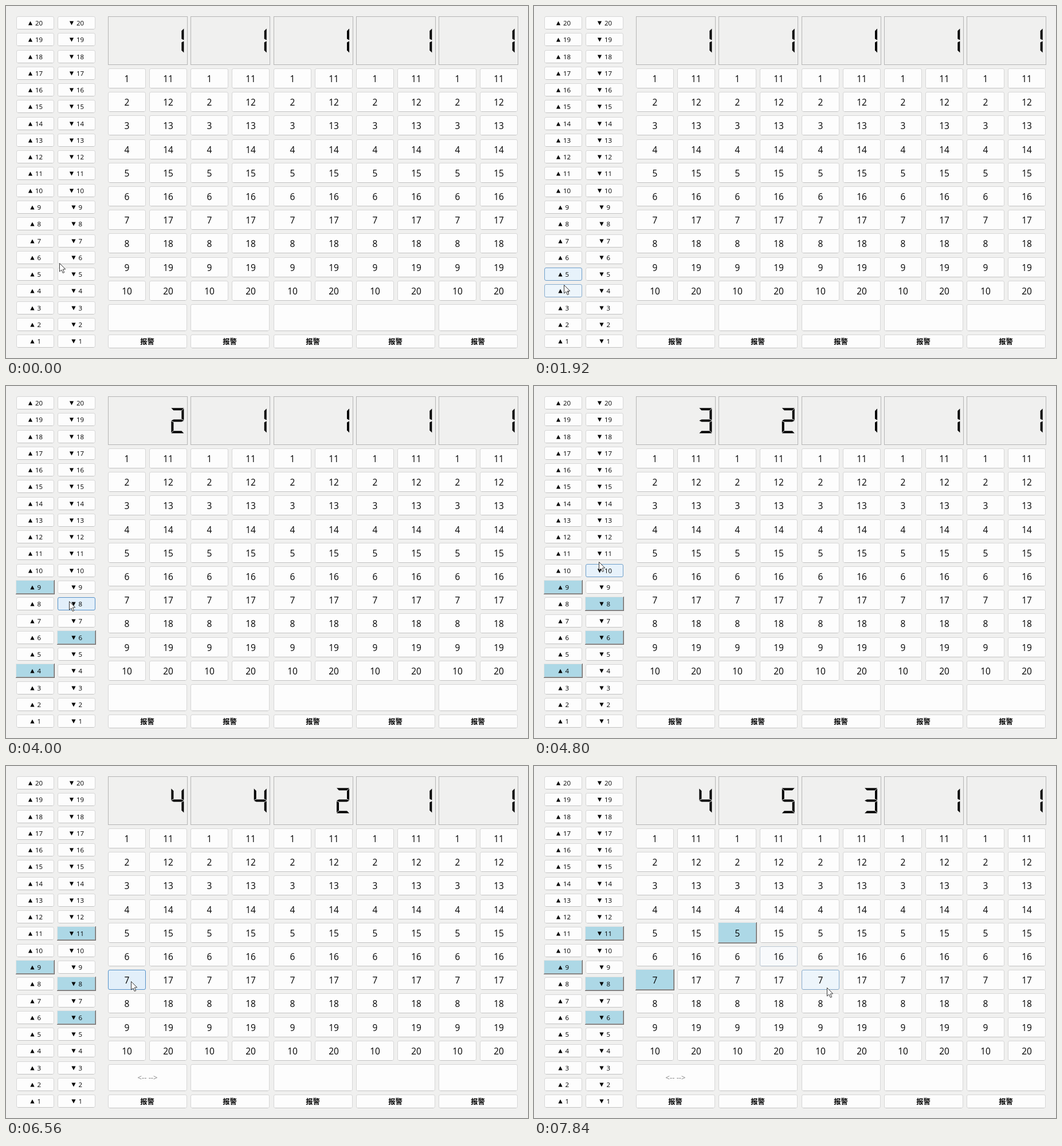
Write an HTML page with a canvas that moves like this. It is 911 px wide and 615 px high and loops after 8000 ms.

```html
<!DOCTYPE html>
<html lang="zh">
<head>
<meta charset="utf-8">
<style>
  html, body { margin: 0; width: 100%; height: 100%; overflow: hidden; background: #f0f0ef; }
  canvas { display: block; }
</style>
</head>
<body>
<canvas id="stage" width="911" height="615"></canvas>
<script>
const ctx = document.getElementById('stage').getContext('2d');
const LOOP = 8000, TICK = 160, FLOOR_TIME = 1000;
const SANS = '"Open Sans", "Noto Sans", sans-serif';
const CJK = '"Noto Sans CJK SC", "Noto Sans CJK", sans-serif';

// Where the pointer pauses, turns or clicks
const stop = (time, x, y, click = false) => ({ time, x, y, click });
const ROUTE = [
  stop(0, 93, 449), stop(800, 185, 403), stop(1760, 64, 472), stop(1920, 52, 487),
  stop(2400, 50, 494, true), stop(2720, 112, 438, true),
  stop(2880, 106, 408), stop(3040, 62, 380), stop(3200, 55, 362), stop(3520, 53, 350, true),
  stop(4160, 114, 378, true), stop(4640, 113, 316), stop(4800, 113, 307), stop(5120, 115, 297, true),
  stop(5600, 266, 366), stop(5760, 282, 414), stop(6400, 218, 376), stop(6720, 218, 376, true),
  stop(7360, 358, 296, true), stop(7680, 463, 362), stop(7840, 511, 387)
];

const LIFTS = [
  { departs: 2500, goal: 4 }, { departs: 3500, goal: 5 }, { departs: 5500, goal: 3 },
  { departs: LOOP, goal: 1 }, { departs: LOOP, goal: 1 }
];
const arrival = lift => lift.departs + (lift.goal - 1) * FLOOR_TIME;
const liftFloor = (lift, t) =>
  Math.min(lift.goal, 1 + Math.max(0, Math.floor((t - lift.departs) / FLOOR_TIME)));

const colX = col => 178 + 72.16 * col;
const inside = (b, p) => p.x >= b.x && p.x <= b.x + b.w && p.y > b.y && p.y <= b.y + b.h;

const buttons = [];
function addButton(floor, x, y, h, arrow = 0) {
  const b = { floor, x: Math.round(x), y: Math.round(y), w: 65, h, arrow };
  const click = ROUTE.find(s => s.click && inside(b, s));
  b.on = click ? click.time : Infinity;
  b.off = arrow < 0 && floor === LIFTS[0].goal ? arrival(LIFTS[0]) : Infinity;
  buttons.push(b);
}
for (let floor = 1; floor <= 20; floor++) {
  const y = 18 + 29.27 * (20 - floor);
  addButton(floor, 18, y, 22, -1);
  addButton(floor, 90, y, 22, 1);
  LIFTS.forEach((_, i) =>
    addButton(floor, colX(2 * i + (floor > 10)), 109 + 41.2 * ((floor - 1) % 10), 34));
}

function pointer(t) {
  const i = Math.max(1, ROUTE.findIndex(s => s.time >= t));
  const a = ROUTE[i - 1], b = ROUTE[i];
  const k = (t - a.time) / (b.time - a.time);
  const ease = k * (2 - k);
  return { x: Math.round(a.x + (b.x - a.x) * ease), y: Math.round(a.y + (b.y - a.y) * ease) };
}

// Highlight rises quickly under the pointer and fades slowly after it
function hoverLevel(b, t) {
  let level = 0;
  for (let s = Math.max(TICK, t - 10 * TICK); s <= t; s += TICK)
    level = inside(b, pointer(s)) ? Math.min(1, level + 0.6) : Math.max(0, level - 0.2);
  return level;
}

const mix = (a, b, k) => `rgb(${a.map((v, i) => Math.round(v + (b[i] - v) * k))})`;

function fillPolygon(points, x, y, color = '#000') {
  ctx.beginPath();
  points.forEach(([px, py]) => ctx.lineTo(x + px, y + py));
  ctx.closePath();
  ctx.fillStyle = color;
  ctx.fill();
}

function label(text, x, y, font, color = '#000', align = 'center') {
  ctx.font = font;
  ctx.fillStyle = color;
  ctx.textAlign = align;
  ctx.fillText(text, x, y);
}

function box(x, y, w, h, hover = 0) {
  const blue = [85, 145, 200];
  ctx.beginPath();
  ctx.roundRect(x + 0.5, y + 0.5, w, h, 2.5);
  ctx.fillStyle = mix([253, 253, 253], [226, 239, 250], hover);
  ctx.fill();
  ctx.strokeStyle = mix([214, 214, 214], blue, hover);
  ctx.lineWidth = 1;
  ctx.stroke();
  ctx.fillStyle = mix([194, 194, 194], blue, hover);
  ctx.fillRect(x + 3, y + h, w - 5, 1);
}

function litBox(x, y, w, h) {
  const layer = (color, inset, edge) => {
    ctx.fillStyle = color;
    ctx.fillRect(x + inset, y + inset, w - inset - edge, h - inset - edge);
  };
  layer('#696969', 0, 0);
  layer('#e3e3e3', 0, 1);
  layer('#a0a0a0', 1, 1);
  layer('#add8e6', 1, 2);
}

function drawButton(b, t) {
  if (t >= b.on && t < b.off) litBox(b.x - 1, b.y - 1, b.w + 3, b.h + 3);
  else box(b.x, b.y, b.w, b.h, hoverLevel(b, t));

  const cx = b.x + b.w / 2 + 0.5, cy = b.y + b.h / 2 + 0.5;
  if (!b.arrow) return label(b.floor, cx, cy + 6, '15.5px ' + SANS);
  const left = cx - (b.floor > 9 ? 12.5 : 9);
  const tip = 3.6 * b.arrow;
  fillPolygon([[0.4, -tip], [7.6, -tip], [4, tip]], left, cy + 0.5);
  label(b.floor, left + 12.5, cy + 4.5, '11.5px ' + SANS, '#000', 'left');
}

// Seven-segment digits: one bar, one post and their mirror images
const LEN = 22, THICK = 4, HALF = THICK / 2;
const flipX = shape => shape.map(([x, y]) => [LEN - x, y]);
const flipY = shape => shape.map(([x, y]) => [x, 2 * LEN - y]);
const bar = [[0, 0], [LEN, 0], [LEN - THICK, THICK], [THICK, THICK]];
const post = [[0, 1], [THICK, THICK + 1], [THICK, LEN - HALF - 1], [0, LEN - 1]];
const middle = [[0, LEN], [THICK, LEN - HALF], [LEN - THICK, LEN - HALF]];
const SEGMENTS = {
  a: bar, b: flipX(post), c: flipX(flipY(post)), d: flipY(bar), e: flipY(post), f: post,
  g: [...middle, ...flipX(flipY(middle))]
};
const DIGITS = { 1: 'bc', 2: 'abged', 3: 'abgcd', 4: 'fgbc', 5: 'afgcd' };

function drawLift(lift, i, t) {
  const exact = colX(2 * i), x = Math.round(exact);
  ctx.strokeStyle = '#b4b4b4';
  ctx.lineWidth = 1;
  ctx.strokeRect(x + 0.5, 18.5, 138, 84);
  for (const s of DIGITS[liftFloor(lift, t)]) fillPolygon(SEGMENTS[s], exact + 110.4, 38.5);
  box(x, 521, 137, 46);
  box(x, 574, 137, 23);
  if (i === 0 && t >= arrival(lift) + FLOOR_TIME)
    label('<-- -->', x + 69, 549, '13px ' + SANS, '#808080');
  label('报警', x + 68.5, 591, 'bold 12.3px ' + CJK);
}

function drawPointer({ x, y }) {
  const arrow = [[0, 0], [0, 14.5], [3.4, 11.5], [5.8, 17], [8.2, 16], [5.8, 10.6], [10.2, 10.4]];
  fillPolygon(arrow, x + 0.5, y + 0.5, '#fff');
  ctx.strokeStyle = '#333';
  ctx.lineWidth = 1;
  ctx.stroke();
}

function frame() {
  const t = Math.floor(performance.now() % LOOP / TICK) * TICK;
  ctx.fillStyle = '#f0f0ef';
  ctx.fillRect(0, 0, 911, 615);
  buttons.forEach(b => drawButton(b, t));
  LIFTS.forEach((lift, i) => drawLift(lift, i, t));
  drawPointer(pointer(t));
  requestAnimationFrame(frame);
}
frame();
</script>
</body>
</html>
```
